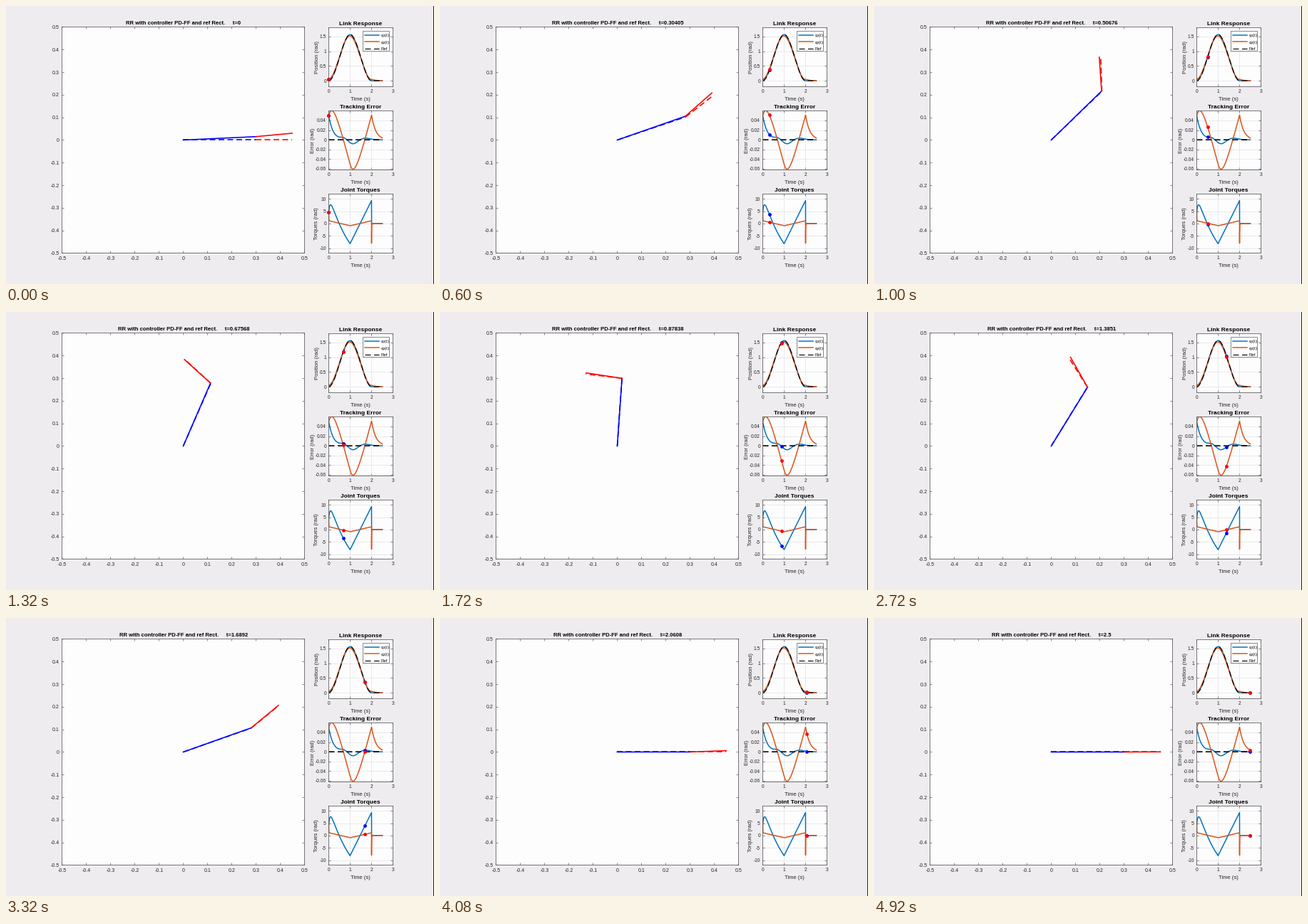
Recreate the animation shown at these times as a matplotlib script. Size 600 px wide and 391 px high, loop 5000 ms.

```python
import numpy as np
import matplotlib.pyplot as plt
from matplotlib.animation import FuncAnimation

W, H, DPI = 600, 391, 100
PX = 72 / DPI
FRAMES, INTERVAL = 125, 40
STEPS, T_END = 74, 2.5
L1, L2 = 0.3, 0.15

PAPER, PANEL, INK = "#eeecef", "#fdfdfe", "#262626"
FRAME, GRID = "#58585a", "#e2e2e4"
BLUE, ORANGE = "#0072bd", "#d95319"

plt.rcParams.update({
    "font.family": "Liberation Sans",
    "axes.unicode_minus": False,
    "mathtext.fontset": "custom",
    "mathtext.rm": "Liberation Sans",
    "lines.dash_capstyle": "butt",
    "lines.scale_dashes": False,
})


def reference(t):
    """Cubic move from 0 to 90 degrees and back, one second each way."""
    s = np.clip(1 - np.abs(t - 1), 0, 1)
    return np.pi / 2 * s * s * (3 - 2 * s)


def bump(t, centre, width):
    return np.exp(-((t - centre) / width)**2 / 2)


def error1(t):
    return (.05 * np.exp(-t / .2) + .0038 * bump(t, .7, .15)
            - .0085 * bump(t, 1.13, .2) + .0035 * bump(t, 1.7, .22))


def error2(t, tau=.195, gain=.083):
    """First-order lag behind the triangular reference acceleration."""
    def chase(start, s, sign):
        steady = sign * gain * (1 + 2 * tau - 2 * s)
        return steady + (start - sign * gain * (1 + 2 * tau)) * np.exp(-s / tau)

    turn = chase(.05, 1, 1)
    stop = chase(turn, 1, -1)
    return np.where(t < 1, chase(.05, t, 1),
                    np.where(t < 2, chase(turn, t - 1, -1),
                             stop * np.exp((2 - t) / tau)))


def torque1(t):
    down = 11.3 - 26.8 * t + 7.3 * t**2 - 6.7 * np.exp(-t / .055)
    up = -8.1 + 17.5 * (t - 1)
    return np.where(t < 1, down, np.where(t < 2, up, 0))


def torque2(t):
    drive = 2.05 * np.abs(t - 1) - .9 + 3.5 * np.exp(-t / .004)
    late = np.maximum(t - 2, 0)
    kick = -7.7 * np.exp(-late / .003) - .3 * np.exp(-late / .06)
    return np.where(t < 2, drive, kick)


def position1(t):
    return reference(t) + error1(t)


def position2(t):
    return reference(t) + error2(t)


def arm(a, b):
    """Elbow and tip of the two-link arm."""
    elbow = L1 * np.array([np.cos(a), np.sin(a)])
    return elbow, elbow + L2 * np.array([np.cos(a + b), np.sin(a + b)])


fig = plt.figure(figsize=(W / DPI, H / DPI), dpi=DPI, facecolor=PAPER)


def label(x, y, text, size, **kw):
    """Text whose capitals are centred on pixel row y."""
    kw = {"ha": "center", "va": "baseline", "color": INK, **kw}
    return fig.text(x / W, 1 - (y + .36 * size) / H, text, fontsize=size * PX, **kw)


def panel(left, top, right, bottom, xlim, ylim, xticks, yticks, size):
    """Axes whose frame falls on the given pixel columns and rows."""
    x, y = left + .49, bottom + .49
    ax = fig.add_axes([x / W, 1 - y / H, (right - left) / W, (bottom - top) / H],
                      facecolor=PANEL, xlim=xlim, ylim=ylim)
    ax.set_xticks(xticks, [f"{v:g}" for v in xticks])
    ax.set_yticks(yticks, [f"{v:g}" for v in yticks])
    ax.tick_params(direction="in", top=True, right=True, length=3 * PX, width=.7 * PX,
                   color=FRAME, labelcolor=INK, labelsize=size * PX, pad=3.6 * PX)
    for spine in ax.spines.values():
        spine.set(linewidth=.8 * PX, color=FRAME)
    return ax


def stroke(ax, x, y, color, width=1.5, dashed=False, **kw):
    style = (0, (8 * PX, 4.5 * PX)) if dashed else "-"
    return ax.plot(x, y, color=color, lw=width * PX, ls=style,
                   scalex=False, scaley=False, **kw)[0]


tenths = np.round(np.arange(-5, 6) * .1, 1)
stage = panel(78, 29, 418, 347, (-.5, .5), (-.5, .5), tenths, tenths, 7)
stage.tick_params(axis="x", pad=5 * PX)
title = label(249, 23.3, "", 7.6, weight="bold", color="black")

time = np.linspace(0, T_END, 1251)
plots = [
    ("Link Response", "Position (rad)", 30, (-.2, 1.8), np.arange(0, 2, .5),
     436, position1, position2, reference(time), 1.2),
    ("Tracking Error", "Error (rad)", 147, (-.0622, .0598), np.arange(-3, 3) * .02,
     430, error1, error2, 0 * time, 1.6),
    ("Joint Torques", "Torques (rad)", 264, (-12, 12), np.arange(-10, 11, 5),
     435.5, torque1, torque2, None, 0),
]

dots = []
for name, ylabel, top, ylim, yticks, label_x, f1, f2, base, base_width in plots:
    ax = panel(452, top, 542, top + 83, (0, 3), ylim, range(4), yticks, 6.7)
    ax.grid(color=GRID, lw=.7 * PX)
    ax.set_axisbelow(True)
    stroke(ax, time, f1(time), BLUE)
    stroke(ax, time, f2(time), ORANGE)
    if base is not None:
        stroke(ax, time, base, "black", base_width, dashed=True)
    label(497, top - 5.8, name, 8.4, weight="bold", color="black")
    label(497, top + 100, "Time (s)", 7.6)
    fig.text(label_x / W, 1 - (top + 42) / H, ylabel, fontsize=7.6 * PX,
             color=INK, rotation=90, ha="center", va="center")
    for f, color in ((f1, "blue"), (f2, "red")):
        dot = stroke(ax, [], [], color, marker="o", ms=4.8 * PX, mew=0,
                     clip_on=False, zorder=5)
        dots.append((dot, f))

# Legend of the first plot and the dark right edge of the stage
overlay = fig.add_axes([0, 0, 1, 1], xlim=(0, W), ylim=(H, 0), zorder=3)
overlay.axis("off")
overlay.add_patch(plt.Rectangle((500.49, 35.49), 37, 28, fc="white", ec=FRAME, lw=.7 * PX))
entries = [(r"$\mathrm{q_1(t)}$", BLUE), (r"$\mathrm{q_2(t)}$", ORANGE), ("Ref", "black")]
for row, (text, color) in enumerate(entries):
    y = 41 + 9.4 * row
    ref_entry = color == "black"
    stroke(overlay, [503, 523], [y, y], color, 1.2 if ref_entry else 1.5, ref_entry)
    overlay.text(525, y + 2.1, text, fontsize=6 * PX, color="black", va="baseline")
overlay.add_patch(plt.Rectangle((W - 1, 0), 1, H, fc="#202022", lw=0))

links = []
for dashed in (True, False):
    links.append([stroke(stage, [], [], c, 1.6, dashed, zorder=3) for c in ("blue", "red")])


def draw(frame):
    step = min((3 * frame + 1) // 5, STEPS)
    t = T_END * step / STEPS
    now = np.array([t])
    title.set_text(f"RR with controller PD-FF and ref Rect.     t={t:.5g}")
    r = reference(t)
    poses = [(r, r), (position1(now)[0], position2(now)[0])]
    for (upper, lower), pose in zip(links, poses):
        elbow, tip = arm(*pose)
        upper.set_data([0, elbow[0]], [0, elbow[1]])
        lower.set_data([elbow[0], tip[0]], [elbow[1], tip[1]])
    for dot, f in dots:
        dot.set_data(now, f(now))
    return [title, *sum(links, []), *(dot for dot, _ in dots)]


anim = FuncAnimation(fig, draw, frames=FRAMES, interval=INTERVAL,
                     repeat=True, repeat_delay=0, blit=False)
plt.show()
```
